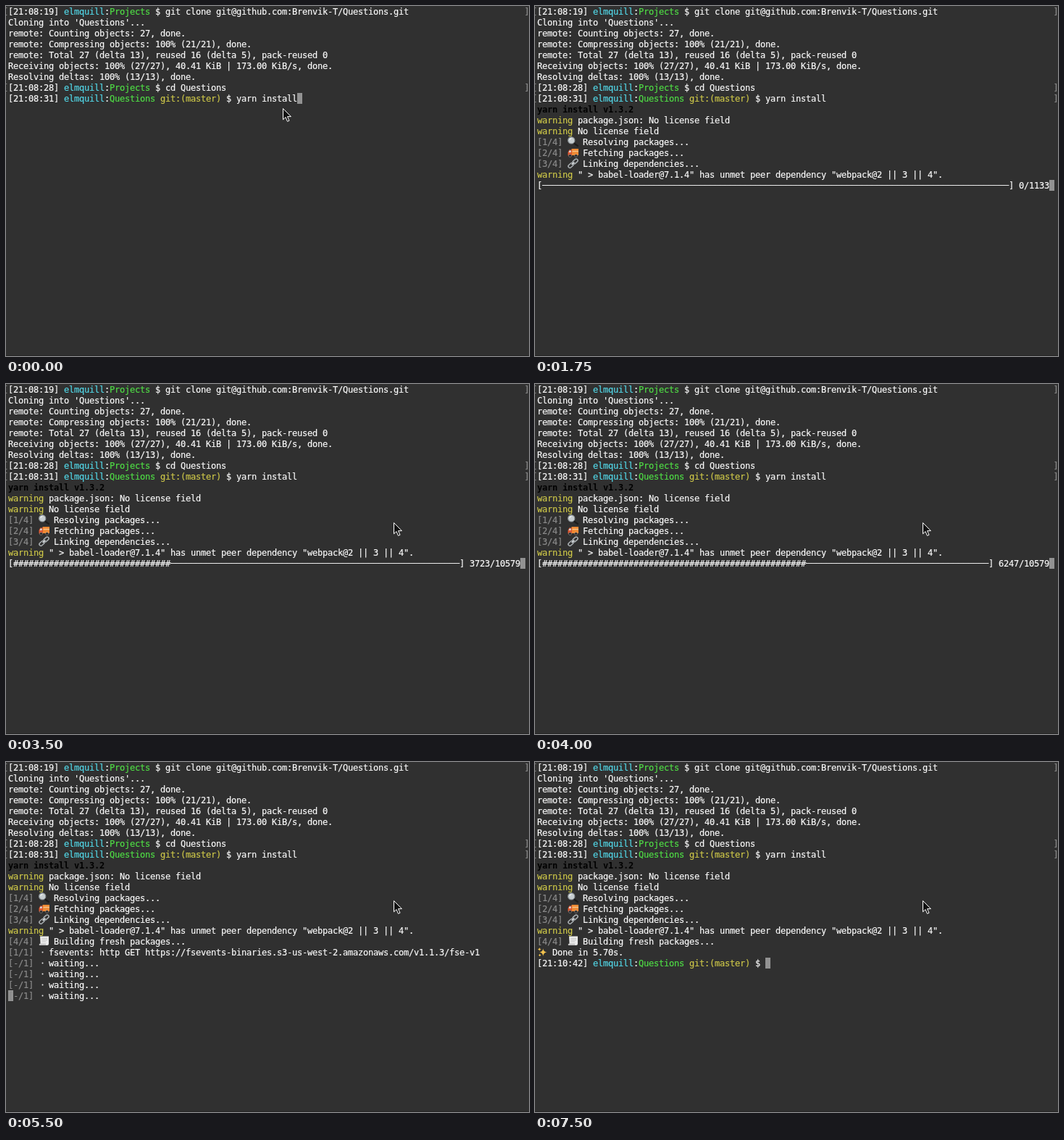
These frames come from a looping animation (722 by 483 pixels, 8000 ms). An HTML page:

```html
<!DOCTYPE html>
<html lang="en">
<head>
<meta charset="utf-8">
<title>Terminal</title>
<style>
  html, body { margin: 0; width: 100%; height: 100%; overflow: hidden; background: #303030; }
  svg { display: block; position: absolute; left: 0; top: 0; }
  text {
    font: 12px "DejaVu Sans Mono", "Liberation Mono", monospace;
    white-space: pre; fill: currentColor; stroke: currentColor; stroke-width: .2;
  }
  .w { color: #f8f8f8; }
  .c { color: #52d6e6; }
  .g { color: #4fdc45; }
  .y { color: #cbc548; }
  .d { color: #8a8a8a; }
  .k { color: #000; font-weight: bold; stroke: none; }
</style>
</head>
<body>
<svg width="722" height="483" viewBox="0 0 722 483">
  <defs>
    <g id="lens">
      <path d="M9 9.5 L14 13.2" stroke="#1c1c1c" stroke-width="2.2" stroke-linecap="round"/>
      <circle cx="5.2" cy="5.4" r="4.6" fill="#c6cdd0" stroke="#8b9296" stroke-width="1.2"/>
      <path d="M2.6 5 Q3.2 2.8 5.4 2.6" fill="none" stroke="#fff"/>
    </g>
    <g id="truck">
      <path d="M5.5 2 H15 V11 H5.5 Z" fill="#ef8a34"/>
      <path d="M0.5 11.5 V7 L2.2 3.5 H5.8 V11.5 Z" fill="#e2572f"/>
      <path d="M1.6 7 L2.7 4.6 H4.6 V7 Z" fill="#cfe3ea"/>
      <path d="M6.5 5.5 H15" stroke="#f8c58c" stroke-width="1.4"/>
      <circle cx="3.4" cy="11.6" r="1.9" fill="#222" stroke="#999" stroke-width=".6"/>
      <circle cx="11.6" cy="11.6" r="1.9" fill="#222" stroke="#999" stroke-width=".6"/>
    </g>
    <g id="link" fill="none" stroke="#aab0b3" stroke-width="1.5">
      <rect x="-3.9" y="-2.2" width="7.8" height="4.4" rx="2.2" transform="translate(4.4 10) rotate(-42)"/>
      <rect x="-3.9" y="-2.2" width="7.8" height="4.4" rx="2.2" transform="translate(10.6 4.4) rotate(-42)"/>
      <path d="M5.6 9 L9.4 5.5" stroke="#d5d9db"/>
    </g>
    <g id="page">
      <path d="M2 0.5 H14 V10.5 Q14 13 11.5 13 H1 Q3 12.5 2.5 10 Z" fill="#ececec"/>
      <path d="M1 13 Q0 10.6 2.5 10.4 H10 Q9.5 12.5 11.5 13 Z" fill="#c4c4c4"/>
      <path d="M4.5 3.5 H12 M4.5 5.7 H12 M4.5 7.9 H10" stroke="#b4b4b4" stroke-width=".7"/>
    </g>
    <g id="spark" fill="#f2c24e">
      <path d="M8.2 2.6 Q8.8 7 13.4 7.6 Q8.8 8.2 8.2 12.8 Q7.6 8.2 3 7.6 Q7.6 7 8.2 2.6 Z"/>
      <path d="M3.2 1 Q3.5 3.1 5.6 3.4 Q3.5 3.7 3.2 5.8 Q2.9 3.7 .8 3.4 Q2.9 3.1 3.2 1 Z"/>
      <path d="M3.6 9.4 Q3.9 11.2 5.6 11.5 Q3.9 11.8 3.6 13.6 Q3.3 11.8 1.6 11.5 Q3.3 11.2 3.6 9.4 Z"/>
    </g>
  </defs>
  <text id="probe" visibility="hidden"></text>
  <rect y="482" width="722" height="1" fill="#252525"/>
  <g id="screen"></g>
  <path id="pointer" d="M.5 .5 V15.8 L4 12.5 L6.5 18.3 L9 17.2 L6.5 11.6 H11.4 Z"
        fill="#111" stroke="#fff" stroke-width="1" stroke-linejoin="round"/>
</svg>
<script>
const LOOP = 8000, STEP = 250, CELL = 7, ROW = 15, LEFT = 3, COLS = 101;
const $ = id => document.getElementById(id);
const colX = col => LEFT + col * CELL;

// Squeeze the font onto the 7px character grid.
const probe = $('probe');
probe.textContent = 'm'.repeat(100);
const spacing = CELL - probe.getComputedTextLength() / 100;
probe.remove();
document.querySelector('svg').style.letterSpacing = spacing + 'px';

const text = (row, col, cls, str, lift = 0) =>
  `<text class="${cls}" x="${colX(col)}" y="${row * ROW + 12 - lift}">${str}</text>`;

// Takes pairs of colour class and string, laid out one after another.
function line(row, ...parts) {
  let out = '', col = 0;
  for (let i = 0; i < parts.length; i += 2) {
    out += text(row, col, parts[i], parts[i + 1]);
    col += parts[i + 1].length;
  }
  return out;
}

const icon = (row, col, name) => `<use href="#${name}" x="${colX(col)}" y="${row * ROW}"/>`;
const cursor = (row, col) =>
  `<rect x="${colX(col)}" y="${row * ROW}" width="${CELL}" height="${ROW}" fill="#929292"/>`;
const marks = row => text(row, -1, 'd', '[') + text(row, 101.8, 'd', ']');
const stage = (row, n, name, label) =>
  line(row, 'd', `[${n}/4]`, 'w', '    ' + label + '...') + icon(row, 6, name);

// One lit dot of a braille cell.
const dot = (row, col, dx, dy) =>
  `<circle cx="${colX(col) + 2.5 + dx * 3}" cy="${row * ROW + 4.5 + dy * 3}" r="1" fill="#eee"/>`;

function prompt(row, time, dir, cmd, git) {
  const parts = ['w', `[${time}] `, 'c', 'elmquill', 'w', ':', 'g', dir + ' '];
  if (git) parts.push('y', 'git:(master) ');
  return line(row, ...parts, 'w', '$ ' + cmd);
}

function bar(row, done, total) {
  const tail = `] ${done}/${total}`;
  const size = COLS - 1 - tail.length;
  const full = Math.round(done / total * size);
  return text(row, 0, 'w', '[' + '#'.repeat(full))
    + text(row, 1 + full, 'w', '–'.repeat(size - full), .7)
    + text(row, 1 + size, 'w', tail)
    + cursor(row, COLS);
}

const linked = [288, 1438, 2651, 3723, 4926, 6247, 7572, 8893, 10221];

const header = prompt(0, '21:08:19', 'Projects', 'git clone git@github.com:Brenvik-T/Questions.git')
  + [
    "Cloning into 'Questions'...",
    'remote: Counting objects: 27, done.',
    'remote: Compressing objects: 100% (21/21), done.',
    'remote: Total 27 (delta 13), reused 16 (delta 5), pack-reused 0',
    'Receiving objects: 100% (27/27), 40.41 KiB | 173.00 KiB/s, done.',
    'Resolving deltas: 100% (13/13), done.'
  ].map((str, i) => line(i + 1, 'w', str)).join('')
  + prompt(7, '21:08:28', 'Projects', 'cd Questions')
  + prompt(8, '21:08:31', 'Questions', 'yarn install', true)
  + marks(0) + marks(7);

function workers(ms) {
  const odd = ms / STEP % 2;
  const job = ms < 5500 ? 'waiting...'
    : 'fsevents: http GET https://fsevents-binaries.s3-us-west-2.amazonaws.com/v1.1.3/fse-v1';
  let out = cursor(21, 0);
  for (let i = 0; i < 5; i++) {
    out += line(17 + i, 'd', i ? '[-/1]' : '[1/1]', 'w', '   ' + (i ? 'waiting...' : job));
    out += odd ? dot(17 + i, 6, 0, 2) : dot(17 + i, 6, 1, 1);
  }
  return out;
}

function screen(ms) {
  if (ms < 750) return header + cursor(8, 57);
  let out = header + marks(8);
  if (ms < 1000) return out + cursor(9, 0);

  out += line(9, 'k', 'yarn install v1.3.2')
    + line(10, 'y', 'warning', 'w', ' package.json: No license field')
    + line(11, 'y', 'warning', 'w', ' No license field')
    + stage(12, 1, 'lens', 'Resolving packages');
  if (ms < 1500) return out + dot(13, 0, 0, 0) + cursor(13, 2);

  out += stage(13, 2, 'truck', 'Fetching packages');
  if (ms < 1750) return out + bar(14, 640, 1133);

  out += stage(14, 3, 'link', 'Linking dependencies')
    + line(15, 'y', 'warning', 'w', ' " > babel-loader@7.1.4" has unmet peer dependency "webpack@2 || 3 || 4".');
  if (ms < 2750) return out + bar(16, 0, 1133);
  if (ms < 5000) return out + bar(16, linked[(ms - 2750) / STEP], 10579);
  if (ms < 5250) return out + bar(16, 291, 1133);

  out += stage(16, 4, 'page', 'Building fresh packages');
  if (ms < 6750) return out + workers(ms);
  return out + icon(17, 0, 'spark') + line(17, 'w', '   Done in 5.70s.')
    + prompt(18, '21:10:42', 'Questions', '', true) + cursor(18, 45);
}

// Pointer stops: start time, x, y; no place means hidden.
const stops = [[0, 382, 141], [1000, 430, 140], [1250, 677, 79], [1500, 641, 107], [1750], [2000, 535, 191]];

let shown = -1;
function draw(now) {
  const ms = Math.floor(now % LOOP / STEP) * STEP;
  if (ms !== shown) {
    shown = ms;
    $('screen').innerHTML = screen(ms);
    const [, x, y] = stops.filter(s => s[0] <= ms).pop();
    const pointer = $('pointer');
    pointer.setAttribute('visibility', x === undefined ? 'hidden' : 'visible');
    if (x !== undefined) pointer.setAttribute('transform', `translate(${x} ${y})`);
  }
}

const start = performance.now();
function tick() {
  draw(performance.now() - start);
  requestAnimationFrame(tick);
}
tick();
</script>
</body>
</html>
```
